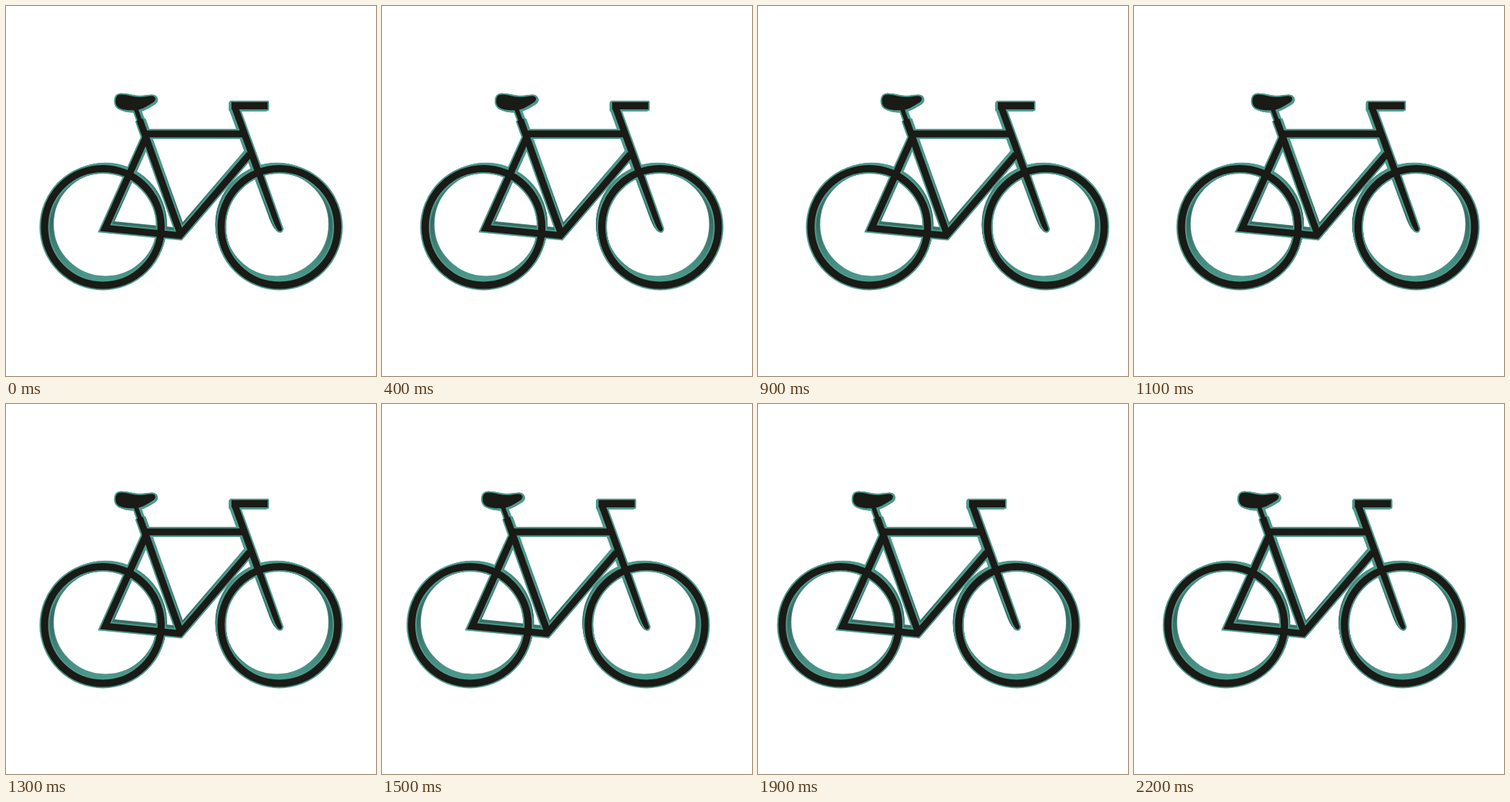
These frames come from a looping animation (512 by 512 pixels, 2.3 s). An HTML page:

```html
<!DOCTYPE html>
<html lang="en">
<head>
<meta charset="utf-8">
<title>Bicycle</title>
<style>
  @property --k { syntax: "<number>"; inherits: true; initial-value: 0; }

  html, body { margin: 0; width: 100%; height: 100%; overflow: hidden; background: #fff; }
  svg { display: block; width: 100vw; height: 100vh; }

  /* rest, then one sine sway in twenty hard steps */
  #ride {
    animation: sway 2300ms infinite;
    transform: translateX(calc(21px * sin(var(--k) * 18deg)));
  }
  @keyframes sway {
    0% { --k: 0; }
    13.04% { --k: 0; animation-timing-function: steps(20, end); }
    100% { --k: 20; }
  }

  /* --rim widens every part by the bevel, --c colours the layer */
  .tube { fill: none; stroke: var(--c); stroke-width: calc(var(--w) + var(--rim)); stroke-miterlimit: 8; }
  .solid { fill: var(--c); stroke: var(--c); stroke-width: var(--rim); stroke-linejoin: round; }
  .wheel { --w: 10px; }
  .bar { --w: 9.4px; }
  .post { --w: 6px; }
  .wall { --rim: 4px; --c: url(#shade); }
  .edge { --rim: 4px; --c: #4c9a8d; }
  .face { --rim: 0px; --c: #1a1a16; }
</style>
</head>
<body>
<svg viewBox="0 0 512 512">
  <defs>
    <linearGradient id="shade" gradientUnits="userSpaceOnUse" x1="0" y1="220" x2="0" y2="390">
      <stop offset="0" stop-color="#4c9a8d"/>
      <stop offset=".45" stop-color="#386a62"/>
      <stop offset="1" stop-color="#4f9d90"/>
    </linearGradient>
    <g id="bike">
      <circle class="tube wheel" cx="134" cy="305.8" r="80.7"/>
      <circle class="tube wheel" cx="378.3" cy="305.8" r="80.7"/>
      <path class="tube bar" d="M193 183L137 307.5L240.5 317.6L337 205"/>
      <path class="tube bar" d="M185 157.5L241 314"/>
      <path class="tube bar" d="M194 177H330"/>
      <path class="tube bar" d="M317 141L350 232"/>
      <path class="tube post" d="M179.5 142L186 160"/>
      <path class="solid" d="M344.8 230L370 298Q374 308 377 311Q381 313.5 382 308.5L354.4 230Z"/>
      <path class="solid" d="M312 133H362V143H312Z"/>
      <path class="solid" d="M151.5 132C151.5 125 154.5 122 160.5 122.5C170 123 175.5 126 184.5 126C193.5 126 197.5 124 202.5 124.5C207.5 125 208.5 130 203.5 133.5C195.5 138 190 143 180 144C172 145 161.5 144 155.5 140.5C152.5 138 151.5 135 151.5 132Z"/>
    </g>
  </defs>
  <g id="ride">
    <g id="depth"></g>
    <use class="edge" href="#bike"/>
    <use class="face" href="#bike"/>
  </g>
</svg>
<script>
  // Extruded sides: copies shrinking toward a vanishing point, the farthest one a bright edge.
  const depth = document.getElementById("depth");
  const layers = 8;
  for (let i = 0; i < layers; i++) {
    const scale = 0.97 + 0.03 * i / layers;
    const copy = document.createElementNS("http://www.w3.org/2000/svg", "use");
    copy.setAttribute("href", "#bike");
    copy.setAttribute("class", i ? "wall" : "edge");
    copy.setAttribute("transform", `translate(256 176) scale(${scale}) translate(-256 -176)`);
    depth.append(copy);
  }
</script>
</body>
</html>
```
